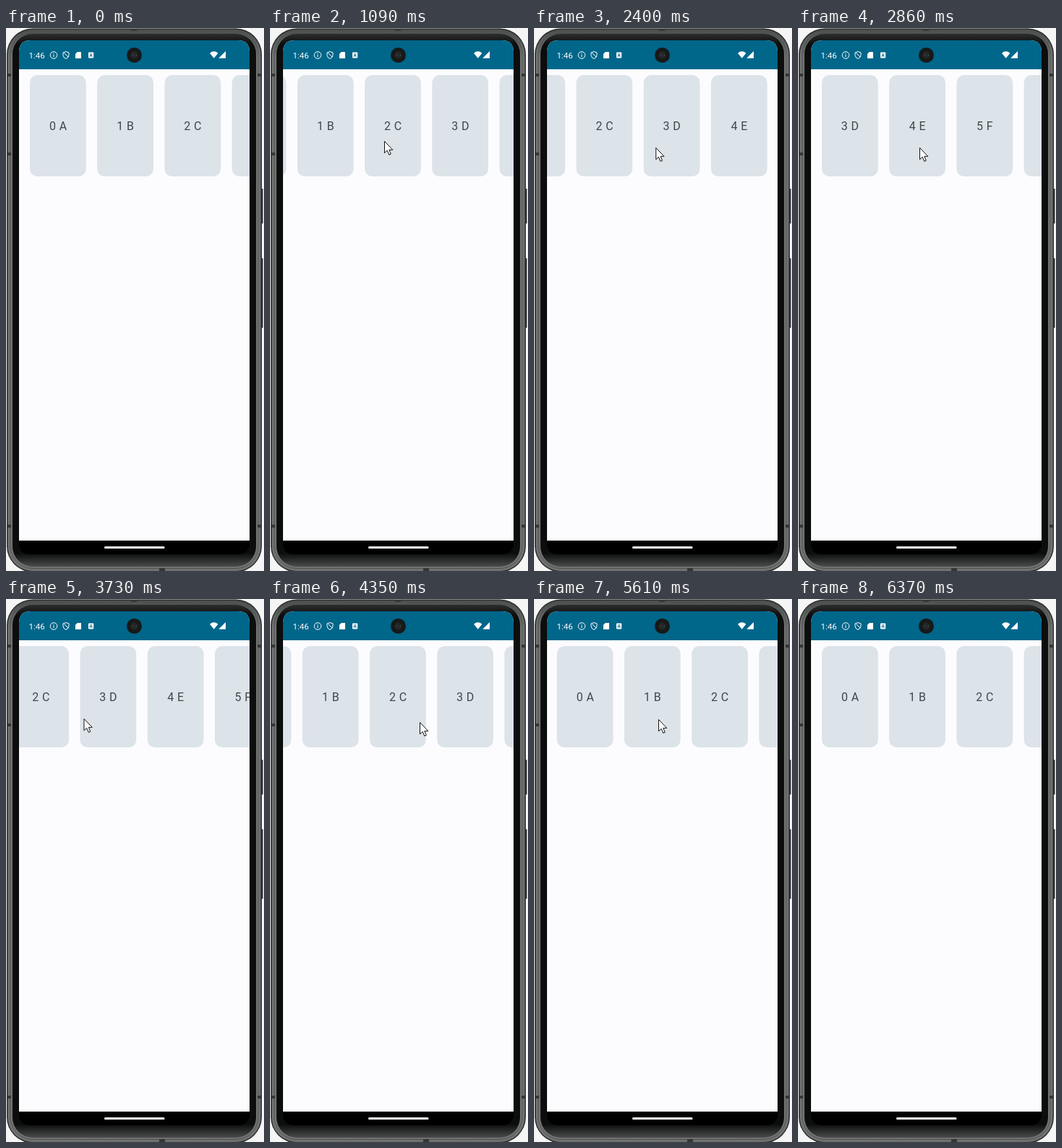
These frames come from a looping animation (357x750 px, 8.03 s). An HTML page:

```html
<!DOCTYPE html>
<html lang="en">
<head>
<meta charset="utf-8">
<title>Snapping card row</title>
<style>
html, body { margin: 0; width: 100%; height: 100%; overflow: hidden; background: #f5f5f5; }
svg { display: block; width: 100%; height: 100%; }
text { font-family: Roboto, sans-serif; }
.card rect { fill: #dce3e9; }
.card text { fill: #40484c; font-size: 16px; letter-spacing: .4px; text-anchor: middle; }
</style>
</head>
<body>
<svg viewBox="0 0 357 750">
  <defs>
    <clipPath id="screen"><path d="M18 708V33Q18 17 34 17H321Q337 17 337 33V708Z"/></clipPath>
    <linearGradient id="rail" x2="0" y2="1">
      <stop offset="0" stop-color="#4c4e4e"/>
      <stop offset=".05" stop-color="#707272"/>
      <stop offset="1" stop-color="#707272"/>
    </linearGradient>
    <linearGradient id="bezel" x2="0" y2="1">
      <stop offset="0" stop-color="#2c2d2d"/>
      <stop offset=".02" stop-color="#0c0d0d"/>
      <stop offset=".975" stop-color="#0c0d0d"/>
      <stop offset="1" stop-color="#4a4c4c"/>
    </linearGradient>
  </defs>

  <!-- Phone body -->
  <path d="M351 222h4.5v48h-4.5zM351 318h4.5v96h-4.5z" fill="#282a2a"/>
  <rect x="1" y=".5" width="353" height="751" rx="36" fill="#2b2d2d"/>
  <rect x="2.5" y="2" width="350" height="748" rx="34.5" fill="url(#rail)"/>
  <rect x="6" y="5.5" width="343" height="741" rx="31" fill="none" stroke="#525454"/>
  <rect x="9" y="8" width="337" height="736" rx="28" fill="url(#bezel)"/>
  <path d="M2 63h5v4H2zM2 172h5v4H2zM348 63h5v4h-5zM2 686h5v4H2zM348 686h5v4h-5zM173 1h8v3h-8zM212 746h8v4h-8z" fill="#353737"/>
  <path d="M18 700H337V711Q337 727 321 727H34Q18 727 18 711Z" fill="#000"/>

  <g clip-path="url(#screen)">
    <path d="M18 17H337V708H18Z" fill="#fcfcff"/>
    <path d="M18 17H337V57H18Z" fill="#00668a"/>
    <g id="row"></g>
  </g>
  <rect x="136" y="716" width="83.5" height="3" rx="1.5" fill="#fff"/>

  <!-- Status bar -->
  <g fill="#fff">
    <text x="31.4" y="41.8" font-size="11.6">1:46</text>
    <circle cx="66" cy="37.5" r="4.8" fill="none" stroke="#fff"/>
    <path d="M65.5 36.8h1v3.3h-1zM65.5 34.7h1v1.1h-1z"/>
    <path d="M83 32.6L87 34V37.3Q87 40.8 83 42.5Q79 40.8 79 37.3V34ZM80.5 34.5L86 40" fill="none" stroke="#fff"/>
    <path d="M98.8 33H103.5Q104 33 104 33.5V41.5Q104 42 103.5 42H96.5Q96 42 96 41.5V35.8Z"/>
    <rect x="114" y="33.5" width="7.2" height="8" rx=".8"/>
    <path d="M282 34.7Q287.7 30 293.4 34.7L287.7 41.8ZM304 32V41.8H294.2Z"/>
  </g>
  <path d="M115.8 39.8L117.6 35.2L119.4 39.8M116.5 38.4H118.7" fill="none" stroke="#00668a" stroke-width=".9"/>

  <!-- Camera -->
  <circle cx="177.5" cy="37.5" r="10.5" fill="#171919"/>
  <circle cx="177.5" cy="37.5" r="5" fill="#252828"/>
  <path d="M174 37.5h7" stroke="#4b5052" stroke-dasharray="1 2"/>

  <path id="cursor" d="M.5 .5V16.6L4.2 13.2L6.8 19.2L9.3 18.1L6.8 12.3H11.8Z" fill="#fff" stroke="#111" stroke-linejoin="round"/>
</svg>
<script>
const LOOP = 8030, STEP = 30, PITCH = 93.2, SETTLE = 380;
const row = document.getElementById("row");
const cursor = document.getElementById("cursor");

row.innerHTML = [..."ABCDEFGHIJ"].map((letter, i) => `
  <g class="card" transform="translate(${33 + i * PITCH} 65)">
    <rect width="77.8" height="140" rx="10.5"/>
    <text x="39.2" y="76">${i} ${letter}</text>
  </g>`).join("");

// The pointer sets off at `reach`, drags from `grab` to `release`,
// then the row snaps to `card`.
const swipes = [
  { reach: 400, grab: 660, release: 960, from: [236, 156], to: [158, 156], card: 1 },
  { reach: 1210, grab: 1880, release: 2420, from: [236, 165], to: [168, 165], card: 3 },
  { reach: 3100, grab: 3300, release: 3760, from: [38, 165], to: [109, 165], card: 2 },
  { reach: 3760, grab: 3910, release: 4350, from: [102, 166], to: [207, 170], card: 1 },
  { reach: 4770, grab: 4960, release: 5380, from: [99, 166], to: [172, 166], card: 0 }
];
const enter = { at: 400, point: [352, 146] };
const leave = { start: 6070, end: 6370, point: [335, 254] };

const progress = (t, a, b) => Math.min(1, Math.max(0, (t - a) / (b - a)));
const smooth = u => u * u * (3 - 2 * u);
const easeOut = u => 1 - (1 - u) ** 3;
const mix = (a, b, u) => a + (b - a) * u;
const move = (p, q, u) => p.map((v, i) => mix(v, q[i], smooth(u)));

function pointerAt(t) {
  let point = enter.point;
  for (const s of swipes) {
    point = move(point, s.from, progress(t, s.reach, s.grab));
    point = move(point, s.to, progress(t, s.grab, s.release));
  }
  return move(point, leave.point, progress(t, leave.start, leave.end));
}

function scrollAt(t) {
  let offset = 0;
  swipes.forEach((s, i) => {
    if (t < s.grab) return;
    const drag = smooth(progress(t, s.grab, s.release));
    const dragged = offset + (s.from[0] - s.to[0]) * drag;
    const end = Math.min(s.release + SETTLE, swipes[i + 1]?.grab ?? LOOP);
    offset = mix(dragged, s.card * PITCH, easeOut(progress(t, s.release, end)));
  });
  return offset;
}

function draw(time) {
  const t = Math.floor((time % LOOP) / STEP) * STEP;
  row.setAttribute("transform", `translate(${-scrollAt(t)} 0)`);
  cursor.setAttribute("transform", `translate(${pointerAt(t)})`);
  cursor.style.display = t >= enter.at && t < leave.end - STEP ? "" : "none";
}

const began = performance.now();
function tick() {
  draw(performance.now() - began);
  requestAnimationFrame(tick);
}
tick();
</script>
</body>
</html>
```
